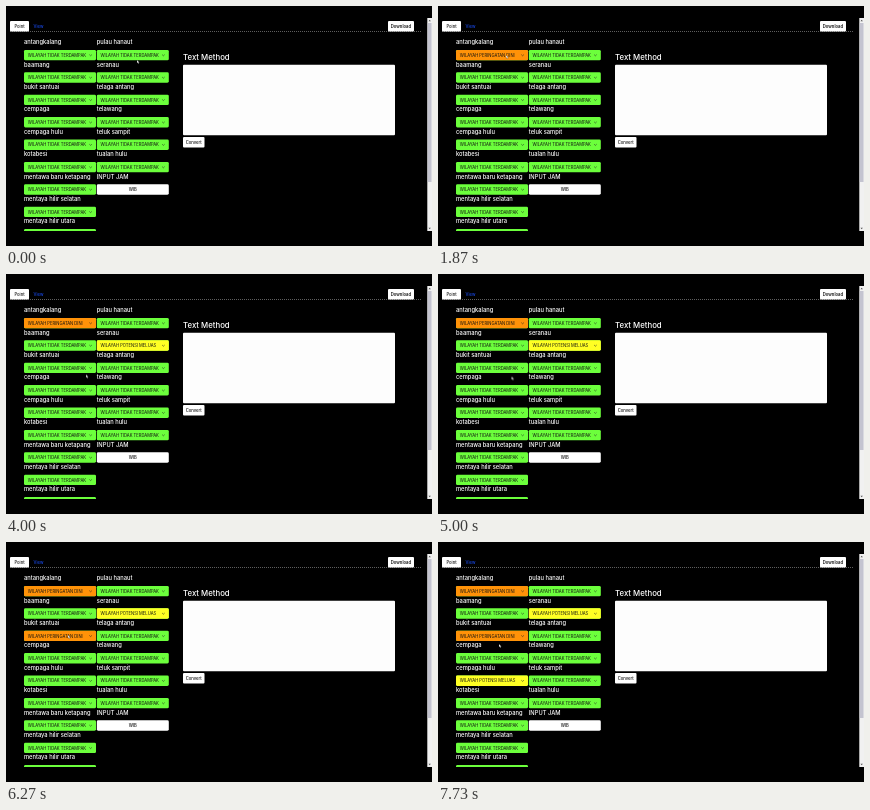
Recreate the animation shown at these times as an HTML page. Size 426x240 px, loop 8 s.

```html
<!DOCTYPE html>
<html lang="id">
<head>
<meta charset="utf-8">
<title>Text Method</title>
<style>
html, body { margin: 0; width: 100%; height: 100%; overflow: hidden; background: #000; }
svg { display: block; width: 100vw; height: 100vh; font-family: Inter, "Open Sans", sans-serif; }
.label { font-size: 5.75px; font-weight: 500; fill: #fff; }
.value { font-size: 4.15px; fill: #111; }
.small { font-size: 4.2px; font-weight: 500; fill: #111; text-anchor: middle; }
.title { font-size: 7.8px; font-weight: 500; fill: #fff; }
.chevron { fill: none; stroke: #222; stroke-width: .55; }
.pick { opacity: 0; animation: 8s step-end infinite; }
#pick0 { animation-name: pick0; }
#pick1 { animation-name: pick1; }
#pick2 { animation-name: pick2; }
#pick3 { animation-name: pick3; }
@keyframes pick0 { 0% { opacity: 0 } 17%, 100% { opacity: 1 } }
@keyframes pick1 { 0% { opacity: 0 } 43%, 100% { opacity: 1 } }
@keyframes pick2 { 0% { opacity: 0 } 70%, 100% { opacity: 1 } }
@keyframes pick3 { 0% { opacity: 0 } 89%, 100% { opacity: 1 } }
#cursor { animation: travel 8s ease-in-out infinite; }
@keyframes travel {
  0%, 2% { transform: translate(131px, 54px) }
  10% { transform: translate(72px, 49px) }
  24% { transform: translate(68px, 49px) }
  35% { transform: translate(132px, 70px) }
  43% { transform: translate(128px, 71px) }
  50% { transform: translate(80px, 100.5px) }
  62.5% { transform: translate(73.5px, 102.5px) }
  67%, 79% { transform: translate(62px, 93px) }
  85%, 89% { transform: translate(60px, 138px) }
  96.5%, 100% { transform: translate(61px, 102px) }
}
</style>
</head>
<body>
<svg viewBox="0 0 426 240" preserveAspectRatio="none">
  <defs><clipPath id="page"><rect y="12" width="426" height="213"/></clipPath></defs>
  <rect width="426" height="240"/>

  <path d="M4 25.5H416" stroke="#777" stroke-width=".8" stroke-dasharray="1 1"/>
  <rect x="4" y="15" width="19" height="10.5" rx="1" fill="#fff"/>
  <text class="small" x="13.5" y="21.7">Point</text>
  <text class="small" x="32.5" y="21.7" style="fill:#1748e8">View</text>
  <rect x="382" y="15" width="26" height="10.5" rx="1" fill="#fff"/>
  <text class="small" x="395" y="21.7" style="font-weight:600">Download</text>

  <g id="form" clip-path="url(#page)"></g>

  <text class="title" x="177" y="54">Text Method</text>
  <rect x="177" y="58.8" width="212" height="70.5" rx="1" fill="#fdfdfd"/>
  <rect x="177" y="131" width="21.5" height="10.5" rx="1" fill="#fff"/>
  <text class="small" x="187.7" y="137.7">Convert</text>

  <rect x="421.3" y="12" width="4.7" height="213" fill="#f1f1f1"/>
  <rect x="421.8" y="17" width="3.7" height="159" fill="#c4c4d0"/>
  <path d="M422.5 15.2l1.2-1.5 1.2 1.5zM422.5 221.8l1.2 1.5 1.2-1.5z" fill="#555"/>

  <path id="cursor" d="M0 0V3.3L.8 2.6 1.4 3.8 2 3.5 1.4 2.4H2.4Z" fill="#fff" stroke="#000" stroke-width=".2"/>
</svg>
<script>
const columns = [
  ["antangkalang", "baamang", "bukit santuai", "cempaga", "cempaga hulu", "kotabesi",
   "mentawa baru ketapang", "mentaya hilir selatan", "mentaya hilir utara"],
  ["pulau hanaut", "seranau", "telaga antang", "telawang", "teluk sampit", "tualan hulu", "INPUT JAM"]
];
const kinds = {
  safe: ["#6cff3c", "TIDAK TERDAMPAK"],
  warning: ["#ff9208", "PERINGATAN DINI"],
  spread: ["#ffff24", "POTENSI MELUAS"]
};
const picks = [[0, 0, "warning"], [1, 1, "spread"], [0, 2, "warning"], [0, 4, "spread"]];

const colX = col => 18 + col * 72.8;
const rowY = row => 43.9 + row * 22.4;
const box = (x, y, fill) => `<rect x="${x}" y="${y}" width="72" height="10.4" rx="1.4" fill="${fill}"/>`;

function selectBox(col, row, kind) {
  const x = colX(col), y = rowY(row), [fill, text] = kinds[kind];
  return box(x, y, fill) +
    `<text class="value" x="${x + 3.7}" y="${y + 6.8}">WILAYAH ${text}</text>` +
    `<path class="chevron" d="M${x + 65.3} ${y + 4.7}l1.3 1.2 1.3-1.2"/>`;
}

let markup = "";
columns.forEach((names, col) => names.forEach((name, row) => {
  const x = colX(col), y = rowY(row);
  markup += `<text class="label" x="${x}" y="${y - 5.7}">${name}</text>`;
  markup += name === "INPUT JAM"
    ? box(x, y, "#fff") + `<text class="small" x="${x + 36}" y="${y + 6.8}">WIB</text>`
    : selectBox(col, row, "safe");
}));
picks.forEach((pick, i) => markup += `<g class="pick" id="pick${i}">${selectBox(...pick)}</g>`);
document.getElementById("form").innerHTML = markup;
</script>
</body>
</html>
```
